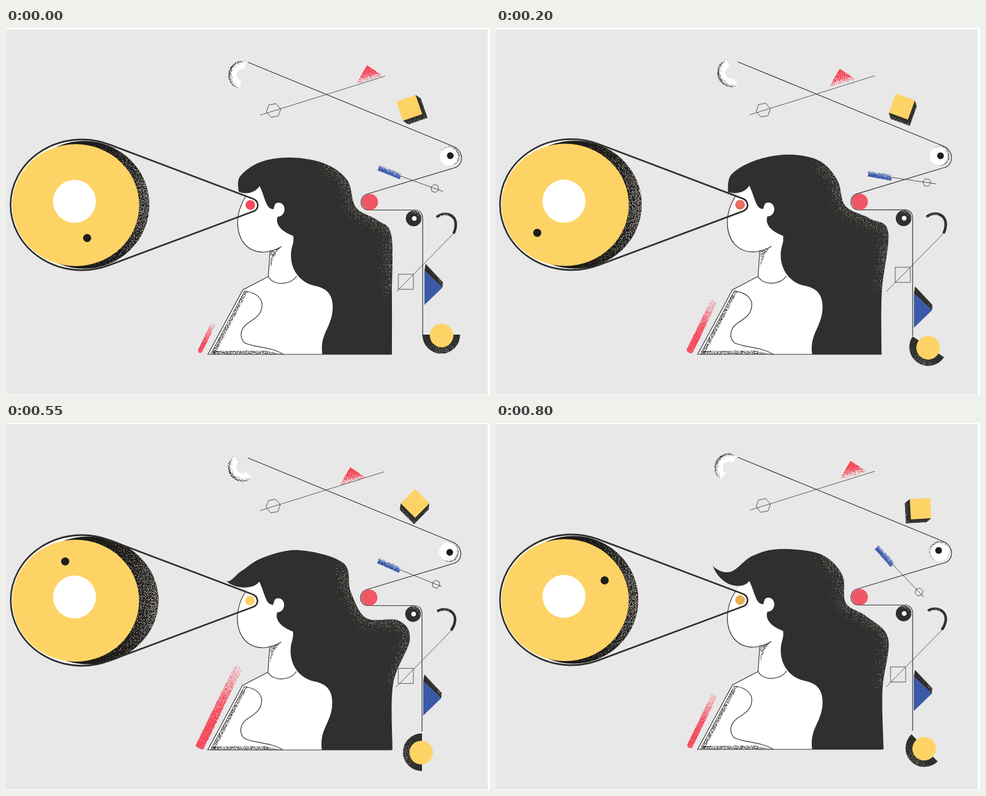
These frames come from a looping animation (834x632 px, 900 ms). An HTML page:

```html
<!DOCTYPE html>
<html lang="en">
<head>
<meta charset="utf-8">
<title>Thought machine</title>
<style>
html, body { margin: 0; width: 100%; height: 100%; overflow: hidden; background: #fff; }
svg { display: block; width: 834px; height: 632px; }
.ink { fill: #2f2f2d; }
.line { fill: none; stroke: #2f2f2d; stroke-width: 1.2; }
.thin { fill: none; stroke: #2f2f2d; stroke-width: .8; }
.yellow { fill: #fed366; }
.blue { fill: #3a59a9; }
.white { fill: #fff; }
.grain { filter: url(#grain); }
</style>
</head>
<body>
<svg viewBox="0 0 834 632">
<defs>
  <!-- turns soft opacity into stippling of the same colour -->
  <filter id="grain" color-interpolation-filters="sRGB">
    <feTurbulence type="fractalNoise" baseFrequency=".83" numOctaves="2" seed="4"/>
    <feColorMatrix values="0 0 0 0 0  0 0 0 0 0  0 0 0 0 0  0 0 0 2 -.5" result="noise"/>
    <feComposite in="SourceAlpha" in2="noise" operator="arithmetic" k2="4" k3="4" k4="-3.8" result="dots"/>
    <feColorMatrix in="SourceGraphic" values="1 0 0 0 0  0 1 0 0 0  0 0 1 0 0  0 0 0 40 0"/>
    <feComposite in2="dots" operator="in"/>
  </filter>
  <filter id="soft" x="-30%" y="-30%" width="160%" height="160%"><feGaussianBlur stdDeviation="8"/></filter>
  <linearGradient id="toRight">
    <stop offset=".52" stop-color="#d0ccc6" stop-opacity="0"/>
    <stop offset=".85" stop-color="#d0ccc6" stop-opacity=".32"/>
    <stop offset="1" stop-color="#d0ccc6" stop-opacity=".5"/>
  </linearGradient>
  <linearGradient id="lightRight">
    <stop offset=".35" stop-color="#c8c5c0" stop-opacity="0"/>
    <stop offset="1" stop-color="#c8c5c0" stop-opacity=".38"/>
  </linearGradient>
  <linearGradient id="lightDown" x2="0" y2="1">
    <stop offset=".3" stop-color="#c8c5c0" stop-opacity="0"/>
    <stop offset="1" stop-color="#c8c5c0" stop-opacity=".36"/>
  </linearGradient>
  <radialGradient id="rim" gradientUnits="userSpaceOnUse" cx="4" cy="0" r="29">
    <stop offset=".7" stop-color="#2f2f2d" stop-opacity="0"/>
    <stop offset="1" stop-color="#2f2f2d" stop-opacity=".85"/>
  </radialGradient>
  <linearGradient id="redFade" gradientUnits="userSpaceOnUse" x1="19" y1="-33" x2="26" y2="-8">
    <stop offset=".45" stop-color="#f5495c"/>
    <stop offset="1" stop-color="#f5495c" stop-opacity=".28"/>
  </linearGradient>
  <linearGradient id="crayonFade" x1="0" y1="1" x2="0" y2="0">
    <stop offset=".3" stop-color="#f5495c"/>
    <stop offset="1" stop-color="#f5495c" stop-opacity=".35"/>
  </linearGradient>
  <linearGradient id="blueFade" x1="0" y1="1" x2="0" y2="0">
    <stop offset=".3" stop-color="#3a59a9"/>
    <stop offset="1" stop-color="#3a59a9" stop-opacity=".35"/>
  </linearGradient>
  <clipPath id="hairClip"><path id="hairShape"/></clipPath>
</defs>

<rect y="2" width="830" height="629" fill="#e8e8e8"/>
<g id="scene">
  <!-- figure -->
  <path class="white" d="M452 428 408 451 348 562H560L580 470 500 420Z"/>
  <path class="white" d="M455 380 452 428C460 444 490 444 501 427L500 350H456Z"/>
  <path class="white" d="M413 290C404 304 399 320 399 336C400 366 416 386 444 386L456 384 500 364 490 290 440 262Z"/>
  <path class="line" d="M413 290C404 304 399 320 399 336C400 366 416 386 444 386Q450 386 455 384L452 428C460 444 490 444 501 427M452 428 408 451 348 562H665"/>
  <path class="line" d="M455 384Q466 382 475 376"/>
  <path class="line" d="M411 453Q436 456 441 473C443 492 430 500 417 508C404 517 401 532 411 542C425 550 458 549 478 562"/>
  <path class="thin" d="M411 453 353 561"/>
  <g class="grain ink" fill-opacity=".54">
    <path d="M411 453H417L361 560H353Z"/>
    <path d="M353 562 358 556Q420 555 450 556L478 562Z"/>
    <path d="M456 385 474 377Q461 390 456 413Z"/>
  </g>
  <path id="hair" class="ink"/>
  <g clip-path="url(#hairClip)"><g class="grain">
    <path id="sheen" fill="none" stroke="#b5aaa2" stroke-width="30" stroke-opacity=".32" filter="url(#soft)"/>
  </g></g>

  <!-- big wheel and belt -->
  <ellipse class="white" cx="123" cy="304.5" rx="114" ry="109"/>
  <ellipse class="shade" cy="304.5" ry="110" fill="#1d1b18"/>
  <ellipse class="shade grain" cy="304.5" ry="110" fill="url(#toRight)"/>
  <ellipse class="yellow" cx="120" cy="304.9" rx="109.5" ry="105"/>
  <circle class="white" cx="118" cy="298.6" r="37"/>
  <circle id="pupil" r="7" fill="#1d1d1b"/>
  <path class="line" style="stroke-width:2.8" d="M424 293.5 178 200.6A123 112.5 0 1 0 178 408.4L427 315.5C437 311 436 297 424 293.5"/>
  <circle id="eye" cx="421" cy="304.8" r="8.3"/>

  <!-- rope -->
  <path class="line" d="M417 59 771 204C788.500 211 790.500 236 772 241L622 286C608 290 608 312 624 313.5H704Q718 314 718 328V530"/>
  <g id="wheel">
    <circle class="white" r="16.5"/>
    <circle class="grain" r="24.5" fill="url(#rim)" transform="scale(-.71)"/>
    <circle cx="2" r="5.8" fill="#1d1d1b"/>
  </g>
  <circle cx="627" cy="299.7" r="14" fill="#f15666"/>
  <g transform="translate(702.5 328)">
    <circle class="ink" r="13.5"/>
    <circle class="grain" r="13.5" fill="url(#lightRight)" transform="rotate(-50)"/>
    <circle class="ink" r="9"/>
    <circle class="white" cx="1" r="4"/>
  </g>

  <!-- floating shapes -->
  <g id="ring">
    <path id="arc" class="white" d="M0-25A25 25 0 0 0 0 25V11A11 11 0 0 1 0-11Z"/>
    <use href="#arc" class="grain" style="fill:url(#rim)"/>
    <path class="grain" fill="url(#rim)" d="M0-25A25 25 0 0 0 0 25V11A11 11 0 0 1 0-11Z"/>
  </g>
  <path class="thin" d="M438 150 653 83"/>
  <path class="thin hex" data-r="12.5" transform="translate(461 142) rotate(-10)"/>
  <path id="triangle" class="grain" fill="url(#redFade)" d="M0 0 19-33 48-14Z"/>
  <g id="cube">
    <path class="ink" d="M17.5-17.5 24-9V26.5H-11L-17.5 17.5Z"/>
    <path class="grain" fill="url(#lightRight)" d="M17.5-17.5 24-9V26.5L17.5 17.5Z"/>
    <path class="grain" fill="url(#lightDown)" d="M17.5 17.5 24 26.5H-11L-17.5 17.5Z"/>
    <path class="yellow" d="M-17.5-17.5h35v35h-35z"/>
  </g>
  <g id="lever">
    <rect class="grain" x="-20.5" y="-5" width="41" height="10" fill="url(#blueFade)" transform="rotate(2)"/>
    <path class="thin" d="M20 0H98"/>
    <path id="nut" class="thin hex" data-r="7"/>
  </g>
  <g id="hook">
    <path class="line" style="stroke-width:4.5" d="M742 326C754 315 775 320 775 338Q775 347 771 354"/>
    <path class="grain" fill="none" stroke="#e8e8e8" stroke-opacity=".32" stroke-width="3" d="M744 327C750 321 757 320 763 323"/>
  </g>
  <path class="thin" d="M772 353 673 454"/>
  <path id="square" class="thin" d="M-13-13h26v26h-26z"/>
  <g id="flag">
    <path class="ink" d="M0 0 2-12 32 20 31 29Z"/>
    <path class="grain" fill="url(#lightRight)" d="M2-6 2-12 32 20 31 25Z"/>
    <path class="blue" d="M0 0V59L31 29Z"/>
  </g>
  <g id="bowl">
    <path class="ink" d="M-32.5 0A32.5 33 0 0 0 32.5 0Z"/>
    <path class="grain" fill="url(#lightDown)" d="M-32.5 0A32.5 33 0 0 0 32.5 0A34 26 0 0 1-32.5 0Z"/>
    <circle class="yellow" cx=".6" cy="1.5" r="20.3"/>
  </g>
  <g transform="translate(333 559) rotate(26)">
    <rect id="crayon" class="grain" rx="4" fill="url(#crayonFade)"/>
  </g>
</g>
</svg>

<script>
const $ = id => document.getElementById(id);
const LOOP = 900;
// when each pose begins, and its place along the pose tracks
const STARTS = [0, 100, 200, 300, 400, 550, 650, 800];
const PLACES = [0, 1, 1.5, 2, 3, 4, 4.5, 5];

const hairPoses = [
  [401,282, 403,256, 438,231, 490,223, 548,233, 588,262, 603,309, 640,331, 664,357, 665,460, 665,562],
  [400,283, 406,252, 446,229, 502,218, 553,229, 586,262, 602,305, 634,328, 667,353, 666,460, 665,562],
  [400,283, 405,255, 444,230, 502,219, 561,229, 591,263, 603,309, 655,329, 685,350, 664,450, 664,562],
  [385,287, 404,258, 442,232, 507,221, 575,229, 602,255, 604,304, 648,321, 693,350, 667,450, 664,562],
  [379,270, 406,254, 443,231, 506,218, 582,240, 595,290, 622,335, 677,339, 697,372, 668,449, 667,562],
  [374,246, 405,256, 442,229, 490,217, 560,226, 597,262, 603,310, 640,334, 676,372, 666,460, 668,562]
];
const eyeColours = [[245,76,92], [243,82,92], [226,136,96], [233,154,126], [252,209,100], [233,173,82]];

const tracks = {
  camera:   { x: [0, 0, -2, -1, .3, -1], y: [0, 0, -1.8, 0, 1, 0],
              w: [1, 1, 1.0025, 1.0013, .998, 1.0013], h: [1, 1, 1.0032, 1, 1, 1] },
  pupil:    { r: [60, 69, 67, 67, 70, 76], a: [70.7, 97.5, 172.3, 207.3, 255, 333.4] },
  wheel:    { x: [764, 764, 764, 764, 764, 764], y: [221, 221, 221, 221, 221, 221], a: [-35, -20, 0, 35, 20, -130] },
  ring:     { x: [408, 408, 405.5, 404, 408, 402], y: [81, 80, 75, 72, 75, 77], a: [15, 0, -45, -73, -40, 35] },
  triangle: { x: [603, 585, 562, 553, 575, 592], y: [97, 99, 108.5, 114, 108, 98] },
  cube:     { x: [695, 698, 701, 700, 706, 731.5], y: [137.5, 136.5, 135.5, 135.5, 137.5, 147.5], a: [-19, 3, 37, 38, 45, 87] },
  lever:    { x: [661, 661.5, 661.5, 661, 661, 670], y: [248, 253, 256.5, 256.5, 244, 229], a: [20, 12.6, 4, 4, 22, 46.5] },
  square:   { x: [689, 697, 705, 699, 690, 693], y: [437, 429, 421.5, 426, 434.5, 433] },
  flag:     { x: [721, 720, 720.5, 720, 720, 720], y: [418, 445, 469.5, 460, 444, 437] },
  bowl:     { x: [750, 748, 742, 731, 718, 738.5], y: [528, 545, 553, 562.5, 566, 559.5], a: [0, 22, 45, 62, 90, 46] }
};
const shadeEdge = [247, 252, 251.5, 259, 263, 246];
const nutPlace = [83, 82.5, 81, 91, 87.6, 85.6];
const hookTurn = [0, 0, 0, 0, 10, 10];
const crayon = { length: [55, 81, 118, 137, 156, 102], width: [8, 10, 13, 14, 15, 10] };

const set = (el, attrs) => { for (const k in attrs) el.setAttribute(k, attrs[k]); };

function at(track, place) {
  const i = Math.floor(place), f = place - i;
  return f ? track[i] + (track[i + 1] - track[i]) * f : track[i];
}

const column = (rows, place) => rows[0].map((_, i) => at(rows.map(r => r[i]), place));

// smooth curve through points, without the opening move
function curve(pts, before = pts[0]) {
  const p = i => i < 0 ? before : pts[Math.min(pts.length - 1, i)];
  let d = "";
  for (let i = 0; i < pts.length - 1; i++) {
    const [a, b, c, e] = [p(i - 1), p(i), p(i + 1), p(i + 2)];
    d += `C${b[0] + (c[0] - a[0]) / 6} ${b[1] + (c[1] - a[1]) / 6} ` +
         `${c[0] - (e[0] - b[0]) / 6} ${c[1] - (e[1] - b[1]) / 6} ${c[0]} ${c[1]}`;
  }
  return d;
}

function drawHair(place) {
  const flat = column(hairPoses, place), pts = [];
  for (let i = 0; i < flat.length; i += 2) pts.push([flat[i], flat[i + 1]]);
  const [tip, next] = pts;
  const flick = (403 - tip[0]) * 1.8; // the further out the tip, the more it curls
  const outer = curve(pts, [next[0] - flick, next[1] - flick]);
  const inner = "L545 562C540 525 563 515 563 480C563 455 548 447 532 444C505 438 491 415 491 392" +
    "C491 375 497 372 495 358C478 352 463 340 468 325C474 325 479 321 480 313C480 302 470 298 464 303" +
    "Q462 307 461 312C448 312 448 296 437 272";
  const fringe = `C428 286 ${390 + (tip[0] - 374) * .8} 286 ${tip[0]} ${tip[1]}Z`;
  const d = `M${tip}` + outer + inner + fringe;
  set($("hair"), { d });
  set($("hairShape"), { d });
  set($("sheen"), { d: `M${pts[4]}` + curve(pts.slice(4, 10)) });
}

function draw(place) {
  const v = track => at(track, place);
  const { camera, pupil, ...movers } = tracks;
  set($("scene"), { transform: `translate(${v(camera.x)} ${v(camera.y)}) scale(${v(camera.w)} ${v(camera.h)})` });
  for (const id in movers) {
    const m = movers[id];
    set($(id), { transform: `translate(${v(m.x)} ${v(m.y)}) rotate(${m.a ? v(m.a) : 0})` });
  }
  const turn = v(pupil.a) * Math.PI / 180, r = v(pupil.r);
  set($("pupil"), { cx: 120 + r * Math.cos(turn), cy: 305 + r * Math.sin(turn) });

  const edge = v(shadeEdge);
  document.querySelectorAll(".shade").forEach(el => set(el, { cx: (edge + 22) / 2, rx: (edge - 22) / 2 }));
  set($("eye"), { fill: `rgb(${column(eyeColours, place).map(Math.round)})` });
  set($("nut"), { transform: `translate(${v(nutPlace)} 0)` });
  set($("hook"), { transform: `rotate(${v(hookTurn)} 758 338)` });
  const w = v(crayon.width), h = v(crayon.length);
  set($("crayon"), { x: -w / 2, y: -h, width: w, height: h });
  drawHair(place);
}

document.querySelectorAll(".hex").forEach(el => {
  const corners = [0, 1, 2, 3, 4, 5].map(i => {
    const a = i * Math.PI / 3;
    return [el.dataset.r * Math.cos(a), el.dataset.r * Math.sin(a)];
  });
  set(el, { d: `M${corners.join(" ")}Z` });
});

let shown = -1;
function tick() {
  const t = performance.now() % LOOP;
  const step = STARTS.filter(s => s <= t).length - 1;
  if (step !== shown) draw(PLACES[shown = step]);
  requestAnimationFrame(tick);
}
tick();
</script>
</body>
</html>
```
